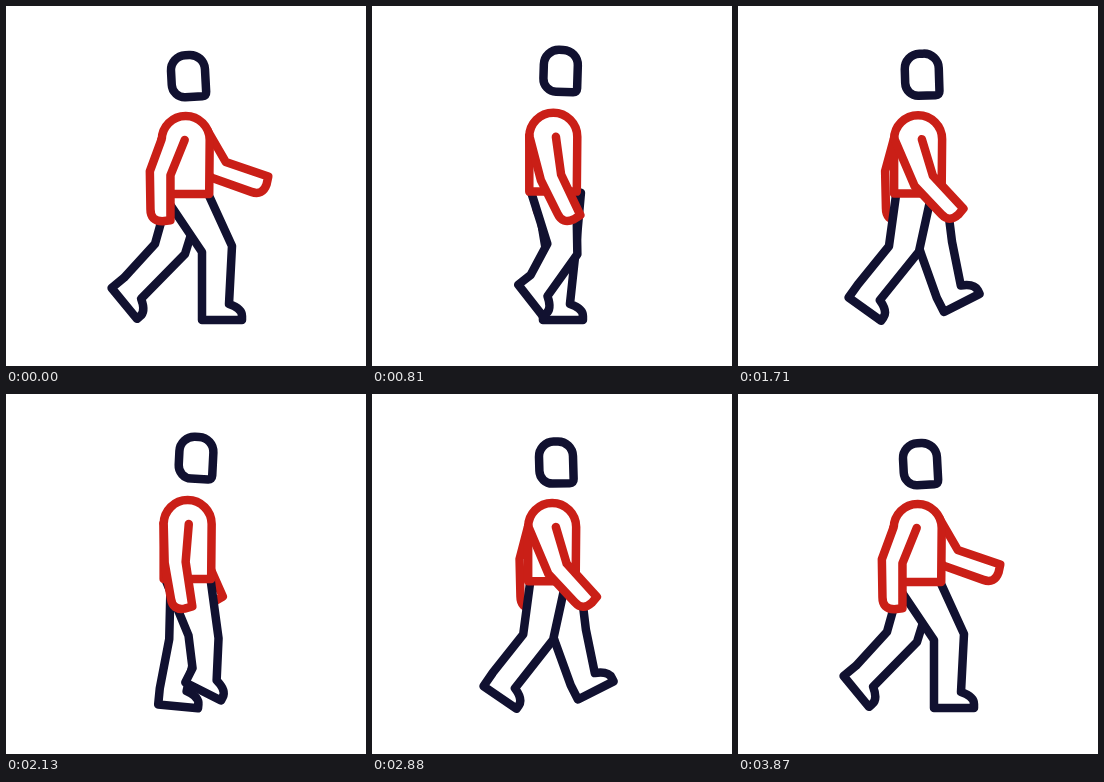
An HTML page for the animation above (3.9 s loop, 360 px wide and 360 px high).

```html
<!DOCTYPE html>
<html lang="en">
<head>
<meta charset="utf-8">
<title>Walking figure</title>
<style>
  html, body { margin: 0; width: 100%; height: 100%; overflow: hidden; background: #fff; }
  svg { display: block; width: 100%; height: 100%; }
  path { fill: #fff; stroke-width: 8.5; stroke-linejoin: round; stroke-linecap: round; }
  .navy { stroke: #111130; }
  .red { stroke: #ca1f17; }
</style>
</head>
<body>
<svg viewBox="0 0 360 360">
  <path id="farArm" class="red"/>
  <path id="farLeg" class="navy"/>
  <path id="nearLeg" class="navy"/>
  <path id="torso" class="red"/>
  <path id="nearArm" class="red"/>
  <path id="head" class="navy"
    d="M13 21Q17 21 17 17V-6A15 15 0 0 0 2 -21H-2A15 15 0 0 0 -17 -6V8A13 13 0 0 0 -4 21Z"/>
</svg>
<script>
const LOOP = 3900, STEP = 30, STRIDE = 1200;
const RAD = Math.PI / 180;
const pt = (x, y) => x.toFixed(2) + ' ' + y.toFixed(2);

// Periodic curve through [phase, value] points that never overshoots them
function track(...keys) {
  const n = keys.length;
  const time = k => keys[(k + n) % n][0] + Math.floor(k / n);
  const value = k => keys[(k + n) % n][1];
  const rise = k => (value(k + 1) - value(k)) / (time(k + 1) - time(k));
  const slope = k => {
    const a = rise(k - 1), b = rise(k);
    return a * b > 0 ? 2 * a * b / (a + b) : 0;
  };
  return phase => {
    const p = phase - Math.floor(phase);
    let i = n - 1;
    while (time(i) > p) i--;
    const h = time(i + 1) - time(i), u = (p - time(i)) / h, v = 1 - u;
    return value(i) + (value(i + 1) - value(i)) * u * u * (3 - 2 * u) +
      h * u * v * (slope(i) * v - slope(i + 1) * u);
  };
}

// Planted and rolling back, lifted, swung forward, heel down
const heelX = track([0, 196], [.24, 160], [.48, 105], [.925, 206]);
const heelY = track([0, 314], [.2, 314], [.6, 276], [.925, 306]);
const footTilt = track([0, 0], [.2, 0], [.6, 60], [.74, 38], [.925, -27]);
const kneeX = track([0, 211], [.12, 195], [.5, 164], [.74, 197], [.925, 199]);
const KNEE_Y = 243;

// How an arm changes from fully back to fully forward
const NEAR = { swing: 41, bend: 48, shift: 5, lift: 0 };
const FAR = { swing: 52, bend: 71, shift: 22, lift: 11 };

// Steady walk, a little faster at the end, easing into the first pose
function walkPhase(t) {
  if (t < 2520) return t / STRIDE;
  if (t < 3240) return 2.1 + .64 * (t - 2520) / 720;
  return 3 - .26 * Math.max(0, 1 - (t - 3240) / 585) ** 2;
}

function legPath(phase, hipX, hipY) {
  const x = heelX(phase), y = heelY(phase), tilt = footTilt(phase), knee = kneeX(phase);
  const c = Math.cos(tilt * RAD), s = Math.sin(tilt * RAD);
  const foot = (u, v) => pt(x + u * c - v * s, y + u * s + v * c);
  const skew = .16 * tilt - 3;
  const frontHip = hipX + 23 + .4 * Math.min(0, knee - 190);
  return `M${pt(frontHip, hipY)}L${pt(knee + 15, KNEE_Y + skew)}L${foot(27, -16)}` +
    `C${foot(33, -14)} ${foot(40, -11)} ${foot(40, -4)}L${foot(40, 0)}L${foot(0, 0)}` +
    `L${foot(0, -16)}L${pt(knee - 15, KNEE_Y - skew)}L${pt(hipX - 22, hipY)}`;
}

function armPath(phase, arm, x, top) {
  const k = (1 - Math.cos(2 * Math.PI * phase)) / 2;
  const upper = (arm.swing * k - 22) * RAD, fore = arm.bend * k * k * RAD;
  const mid = (upper + fore) / 2;
  const sx = x - 1 + arm.shift * k, sy = top - arm.lift * k;
  const ex = sx + 38 * Math.sin(upper), ey = sy + 38 * Math.cos(upper);
  // Forearm frame: along it, and across it towards the back
  const on = (along, across) => pt(
    ex + along * Math.sin(fore) - across * Math.cos(fore),
    ey + along * Math.cos(fore) + across * Math.sin(fore));
  return `M${pt(sx, sy)}L${pt(ex, ey)}L${on(45, 0)}L${on(46, 8)}` +
    `Q${on(46, 20)} ${on(34, 20)}` +
    `L${pt(ex - 21 * Math.cos(mid), ey + 21 * Math.sin(mid))}L${pt(x - 24, top - 1)}`;
}

const set = (id, value, name = 'd') => document.getElementById(id).setAttribute(name, value);

function draw(t) {
  const p = walkPhase(t), bob = Math.cos(4 * Math.PI * p);
  const x = 180.7 - bob, top = 132 + 2 * bob, hip = 186.5 + 1.5 * bob;

  set('farArm', armPath(p + .5, FAR, x, top));
  set('farLeg', legPath(p + .5, x + 5, hip + 1));
  set('nearLeg', legPath(p, x, hip + 1));
  set('torso', `M${pt(x - 24, hip)}L${pt(x - 24, top)}A24 24 0 0 1 ${pt(x + 24, top)}` +
    `L${pt(x + 23.5, hip)}Z`);
  set('nearArm', armPath(p, NEAR, x, top));
  set('head', `translate(${pt(186.3 - 4 * bob, 66.8 + 3.2 * bob)}) rotate(${-3 * bob})`, 'transform');
}

const start = performance.now();
function tick() {
  const t = Math.max(0, performance.now() - start) % LOOP;
  draw(Math.floor(t / STEP) * STEP);
  requestAnimationFrame(tick);
}
tick();
</script>
</body>
</html>
```
